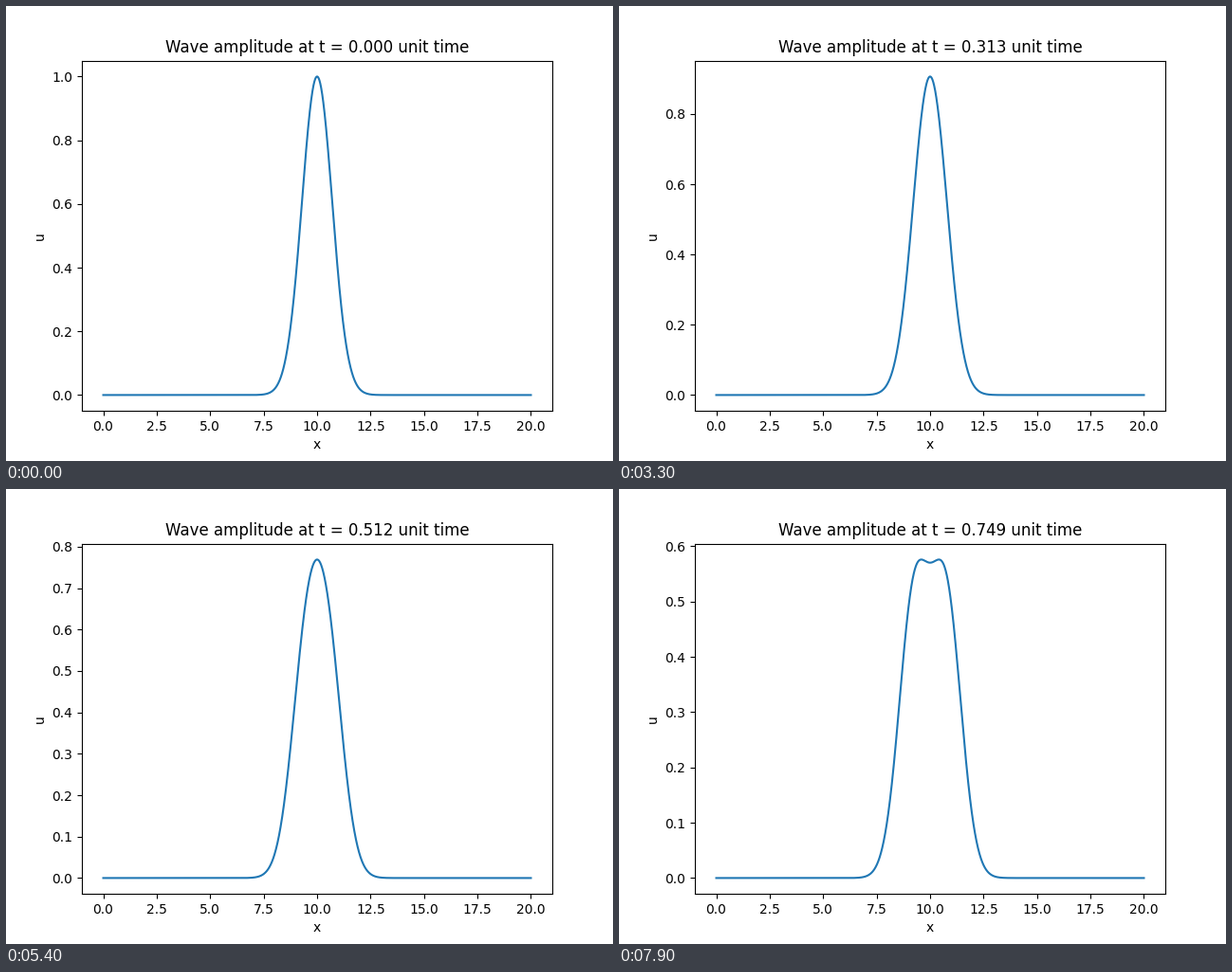
A matplotlib script for the animation above (8 s loop, 640 by 480 pixels).

```python
import numpy as np
import matplotlib.pyplot as plt
from matplotlib.animation import FuncAnimation

FRAMES = 80
LENGTH = 20.0
DX = 0.01
DT = np.sqrt(0.9) * DX  # squared Courant number of 0.9, unit wave speed

x = np.linspace(0, LENGTH, round(LENGTH / DX) + 1)


def pulse(s):
    return np.exp(-(s - LENGTH / 2) ** 2)


def wave(t):
    """d'Alembert solution for a pulse released from rest."""
    return 0.5 * (pulse(x - t) + pulse(x + t))


fig, ax = plt.subplots(figsize=(6.4, 4.8), dpi=100)


def draw(i):
    t = i * DT
    ax.clear()
    ax.plot(x, wave(t))
    ax.set_xlabel("x")
    ax.set_ylabel("u")
    ax.set_title(f"Wave amplitude at t = {t:.3f} unit time")


anim = FuncAnimation(fig, draw, frames=FRAMES, interval=100,
                     repeat=True, repeat_delay=0)
plt.show()
```
